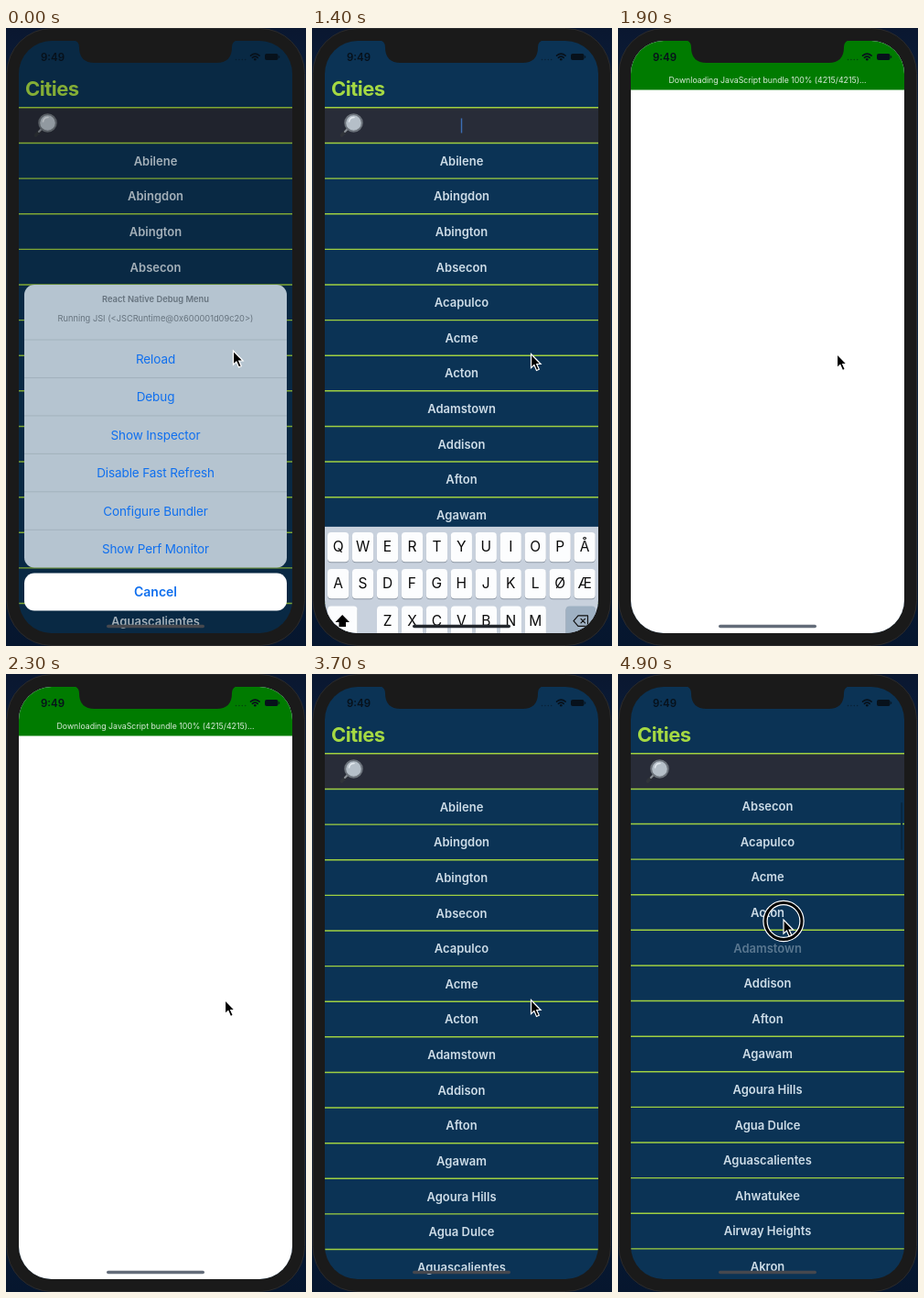
Animation, 328 px wide and 674 px high, one loop 5 s. Source, as an HTML page:

```html
<!DOCTYPE html>
<html lang="en">
<head>
<meta charset="utf-8">
<title>Cities</title>
<style>
html, body { margin: 0; width: 100%; height: 100%; overflow: hidden; background: #071a33; }
svg { display: block; width: 100%; height: 100%; font-family: Inter, "Open Sans", sans-serif; }
</style>
</head>
<body>
<svg viewBox="0 0 328 674">
  <defs>
    <clipPath id="screenClip"><rect x="14" y="14" width="299" height="646" rx="36"/></clipPath>
    <clipPath id="listClip"><rect x="14" y="126" width="299" height="534"/></clipPath>
    <linearGradient id="sky" x2="0" y2="1">
      <stop stop-color="#0a1730"/><stop offset=".3" stop-color="#0b2a4c"/><stop offset="1" stop-color="#06162e"/>
    </linearGradient>
  </defs>
  <rect width="328" height="674" fill="url(#sky)"/>
  <rect x="1" y="0.5" width="325.5" height="673" rx="49" fill="#1a1a1a" stroke="#2b2b2d"/>
  <g clip-path="url(#screenClip)">
    <rect x="14" y="14" width="299" height="646" fill="#0b3355"/>
    <g id="list" clip-path="url(#listClip)"><g id="rows"></g></g>
    <rect id="scrollbar" x="309" y="140" width="2.2" height="52" rx="1" fill="#082842"/>
    <g id="header"></g>
    <path id="caret" d="M163.5 98.5V114.5" stroke="#3c6fb4" stroke-width="1.4"/>
    <g id="spinner"></g>
    <g id="keyboard"></g>
    <rect id="dim" x="14" y="14" width="299" height="646"/>
    <g id="loading"></g>
    <g id="menu"></g>
    <rect id="home" x="110" y="650.7" width="107" height="3.6" rx="1.8"/>
    <g id="status"></g>
  </g>
  <path d="M73 13Q80 14 80 21Q80 38 97 38H230Q247 38 247 21Q247 14 254 13Z" fill="#1a1a1a"/>
  <g id="pointer">
    <g id="ring" fill="none"><circle cy="1.5" r="20" stroke="#fff" stroke-width="5.4"/><circle cy="1.5" r="20" stroke="#000" stroke-width="3"/></g>
    <path d="M0 0V15.2L3.4 12L6 18L8.8 16.8L6.2 11H10.6Z" stroke="#fff" stroke-width="1.2"/>
  </g>
</svg>
<script>
const LIME = '#a0d041', LOOP = 5000, ROW = 38.62;
const $ = id => document.getElementById(id);
const put = (id, ...parts) => $(id).innerHTML = parts.flat().join('');
const text = (s, x, y, size, fill, weight = 400, extra = '') =>
  `<text x="${x}" y="${y + size * .36}" font-size="${size}" fill="${fill}" font-weight="${weight}" text-anchor="middle" ${extra}>${s}</text>`;
const box = (x, y, w, h, fill, r = 0) => `<rect x="${x}" y="${y}" width="${w}" height="${h}" rx="${r}" fill="${fill}"/>`;
const line = (y, color, x1 = 14, x2 = 313, w = 1.4) => `<path d="M${x1} ${y}H${x2}" stroke="${color}" stroke-width="${w}"/>`;
const stroke = (d, color, w = 1.2) => `<path d="${d}" fill="none" stroke="${color}" stroke-width="${w}" stroke-linecap="round" stroke-linejoin="round"/>`;

const cities = ['Abilene', 'Abingdon', 'Abington', 'Absecon', 'Acapulco', 'Acme', 'Acton', 'Adamstown', 'Addison',
  'Afton', 'Agawam', 'Agoura Hills', 'Agua Dulce', 'Aguascalientes', 'Ahwatukee', 'Airway Heights', 'Akron'];
put('rows', cities.map((c, i) =>
  text(c, 163.5, 145 + i * ROW, 13, '#cddce7', 600, c === 'Adamstown' ? 'id="pressed"' : '') + line(164.1 + i * ROW, LIME)));

put('header',
  `<text x="21" y="74" font-size="22" font-weight="700" letter-spacing="-.5" fill="#a5d943">Cities</text>`,
  box(14, 87, 299, 38.5, '#282c38'), line(86.8, LIME), line(125.5, LIME),
  stroke('M39 110L32.5 117', '#30343a', 3.6), stroke('M39 110L36 113', '#8b9198', 2),
  '<circle cx="45.5" cy="103.5" r="9.3" fill="#b5bfc8" stroke="#6d747c" stroke-width="2"/>',
  stroke('M40.5 102A5.5 5.5 0 0 1 46 97.5', '#e2e8ed', 1.6));

put('status',
  text('9:49', 51, 32, 11.5, '#07111b', 600),
  [0, 1, 2, 3].map(i => `<circle cx="${251.5 + i * 3.4}" cy="34.5" r=".8" fill="#07111b" opacity=".5"/>`),
  stroke('M267.5 30.2Q272.3 26 277.1 30.2M269.4 32.4Q272.3 29.9 275.2 32.4', '#07111b', 1.6),
  '<circle cx="272.3" cy="34.2" r="1.3" fill="#07111b"/>',
  box(283, 28, 14.5, 7, '#07111b', 2), box(298.2, 30.2, 1, 2.6, '#07111b', .5));

const blue = '#0f6fee';
const actions = ['Reload', 'Debug', 'Show Inspector', 'Disable Fast Refresh', 'Configure Bundler', 'Show Perf Monitor'];
put('menu',
  box(20, 280, 287, 308.5, '#b5c4d0', 11),
  text('React Native Debug Menu', 163.5, 296, 9.35, '#66737e', 600),
  text('Running JSI (&lt;JSCRuntime@0x600001d09c20&gt;)', 163.5, 316.5, 9.25, '#66737e'),
  actions.map((a, i) => line(340 + i * 41.45, '#9dacb8', 20, 307, .8) +
    text(a, 163.5, 361 + i * 41.45, 13.5, blue, 400, 'letter-spacing="-.1"')),
  box(20, 594.5, 287, 41, '#fff', 11), text('Cancel', 163.5, 615, 14, blue, 600));

const key = (x, y, w, label = '', size = 15.5, fill = '#fcfdfe') =>
  box(x, y + 1, w, 32.3, '#8b95a2', 4) + box(x, y, w, 32.3, fill, 4) + text(label, x + w / 2, y + 16, size, '#0a0a0a');
const keyRow = (letters, x, y) => [...letters].map((c, i) => key(x + i * 26.95, y, 23.2, c));
const gray = '#9fb1c3', ink = '#4b5561';
put('keyboard',
  box(14, 451, 299, 215, '#c8d1dd'),
  keyRow('QWERTYUIOPÅ', 17, 457), keyRow('ASDFGHJKLØÆ', 17, 497), keyRow('ZXCVBNM', 71, 537.5),
  key(17, 537.5, 32.5), '<path d="M33.2 547L41 555H37V560H29.5V555H25.5Z"/>',
  key(277.5, 537.5, 32.5, '', 1, gray),
  stroke('M286 553.8L291 548H301.5V559.5H291ZM294 551.5L298.5 556M298.5 551.5L294 556', '#111'),
  key(17, 577.5, 33, '123', 11, gray), key(55, 577.5, 32.5, '', 1, gray),
  '<circle cx="71.2" cy="593.5" r="6.8" fill="none" stroke="#111" stroke-width="1.2"/><circle cx="68.8" cy="591.5" r="1"/><circle cx="73.6" cy="591.5" r="1"/><path d="M67 594.5H75.4Q74.5 598.5 71.2 598.5T67 594.5Z"/>',
  key(92, 577.5, 144, 'mellomrom', 11), key(240, 577.5, 70, 'retur', 11, gray),
  '<circle cx="44" cy="638" r="9" fill="none" stroke="#4b5561" stroke-width="1.2"/><ellipse cx="44" cy="638" rx="4.2" ry="9" fill="none" stroke="#4b5561" stroke-width="1.1"/>',
  stroke('M44 629V647M35 638H53M37 633Q44 635.5 51 633M37 643Q44 640.5 51 643', ink, 1),
  '<rect x="280.5" y="627.5" width="7" height="13" rx="3.5" fill="none" stroke="#4b5561" stroke-width="1.2"/>',
  stroke('M277 636V637.5Q277.5 644 284 644T291 637.5V636M284 644V648M280 648H288', ink));

put('loading', box(14, 14, 299, 646, '#fff'), box(14, 14, 299, 53.5, '#007b00'),
  text('Downloading JavaScript bundle 100% (4215/4215)...', 163.5, 57, 8.75, '#dcebdc'));

put('spinner', Array.from({length: 12}, (_, i) =>
  `<path d="M0 -6V-11.5" stroke="#36b81c" stroke-width="2.3" stroke-linecap="round" transform="rotate(${i * 30})"/>`));
$('spinner').setAttribute('transform', 'translate(162.5 354)');
const spokes = [...$('spinner').children];

const clamp = (v, a = 0, b = 1) => Math.min(b, Math.max(a, v));
const ramp = (t, a, b) => clamp((t - a) / (b - a));
const ease = p => p * p * (3 - 2 * p);
const show = (id, on) => $(id).style.display = on ? '' : 'none';
const move = (id, x, y) => $(id).setAttribute('transform', `translate(${x} ${y})`);

// Pointer stops: time, x, y
const stops = [[0, 248.5, 352], [600, 239.5, 355.5], [3700, 239.5, 355.5], [4400, 206.5, 424.5],
  [4500, 206.5, 424.5], [4600, 203, 398], [4900, 181, 268]];
function pointerAt(t) {
  const i = clamp(stops.findIndex(s => s[0] > t), -1, stops.length);
  if (i < 0) return stops.at(-1).slice(1);
  const [a, b] = [stops[i - 1], stops[i]];
  const p = t < 4500 ? ease(ramp(t, a[0], b[0])) : ramp(t, a[0], b[0]);
  return [a[1] + (b[1] - a[1]) * p, a[2] + (b[2] - a[2]) * p];
}

function draw(t) {
  const [x, y] = pointerAt(t);
  move('pointer', x, y);
  show('ring', t >= 900 && t < 1200 || t >= 4600);

  const closing = ease(ramp(t, 1100, 1400));
  move('menu', 0, closing * 394);
  show('menu', closing < 1);
  $('dim').setAttribute('opacity', .2 * (1 - closing));

  const rising = 1 - (1 - ramp(t, 1300, 1600)) ** 2;
  const typing = t > 1300 && t < 1900;
  show('keyboard', typing);
  show('caret', typing);
  move('keyboard', 0, 209 * (1 - rising));

  const loading = t >= 1900 && t < 2500, waiting = t >= 2500 && t < 3700;
  show('loading', loading);
  show('spinner', waiting);
  show('list', !loading && !waiting);
  const head = 2 + Math.floor((t - 2900) / 1000 * 12);
  spokes.forEach((s, i) => s.setAttribute('opacity', 1 - (((head - i) % 12 + 12) % 12) / 12 * .8));

  const dragging = t >= 4600;
  move('rows', 0, dragging ? -Math.max(0, 384.5 - y) : 0);
  $('pressed').setAttribute('opacity', dragging ? .4 : 1);
  show('scrollbar', t >= 4700);
  $('home').setAttribute('fill', typing ? '#23272d' : loading ? '#636c79' : '#46484e');
}

let start;
function frame(now) {
  start ??= now;
  draw(Math.floor((now - start) % LOOP / 100) * 100);
  requestAnimationFrame(frame);
}
draw(0);
requestAnimationFrame(frame);
</script>
</body>
</html>
```
